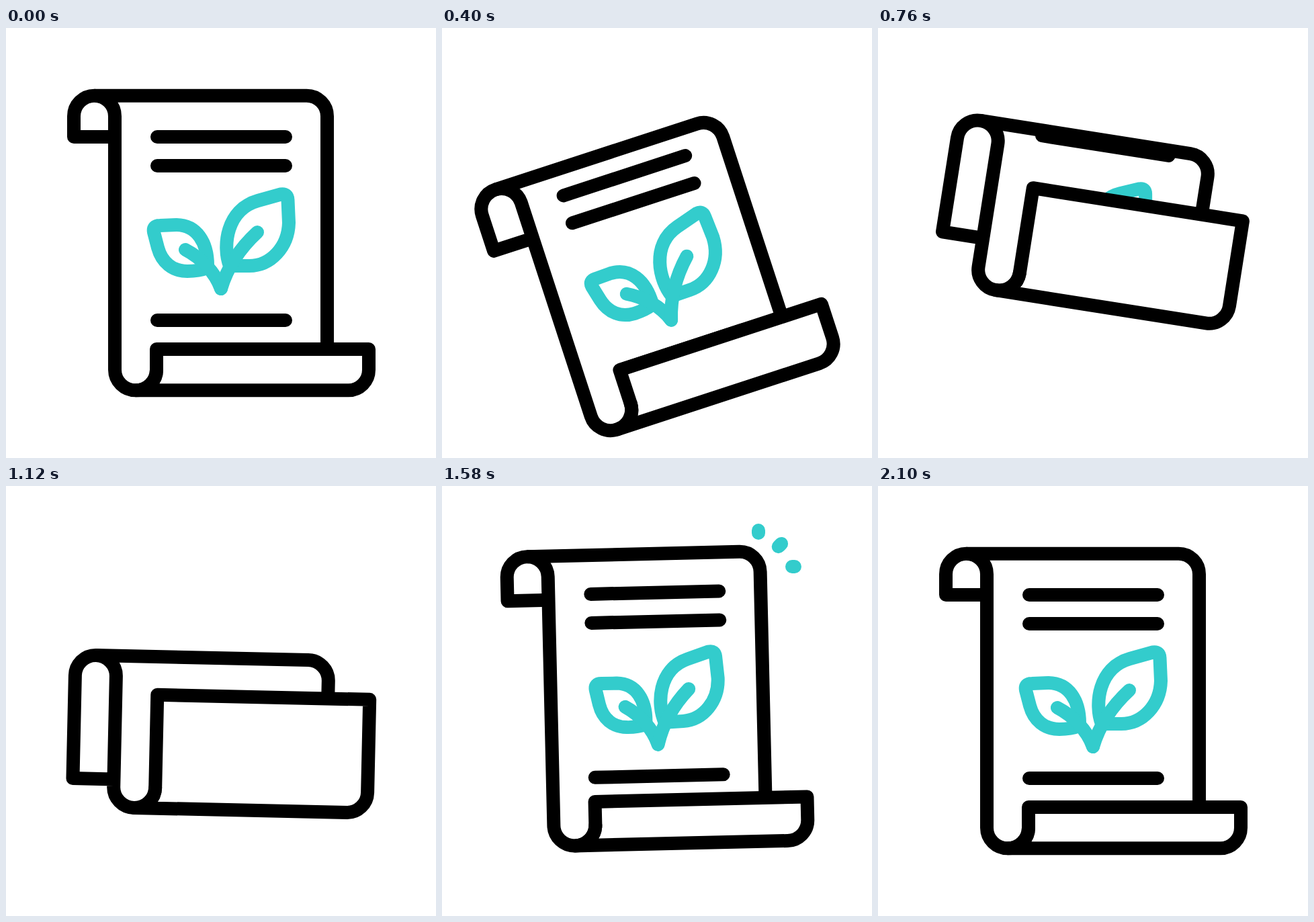
These frames come from a looping animation (640 by 640 pixels, 2400 ms). An HTML page:

```html
<!DOCTYPE html>
<html lang="en">
<head>
<meta charset="utf-8">
<title>Scroll with sprout</title>
<style>
  html, body { margin: 0; width: 100%; height: 100%; overflow: hidden; background: #fff; }
  svg { display: block; width: 100vw; height: 100vh; }
</style>
</head>
<body>
<svg viewBox="0 0 640 640" fill="none" stroke="#000" stroke-width="20" stroke-linecap="round" stroke-linejoin="round">
  <defs>
    <clipPath id="sheet"><rect id="sheetBox" x="162" width="316"/></clipPath>
  </defs>
  <g id="scroll">
    <g clip-path="url(#sheet)">
      <path d="M225 162H416M225 205H416M225 435H416"/>
      <g stroke="#33cccc">
        <g id="leftLeaf">
          <path d="M300 357C301 318 283 293 253 293L229 294Q218 294 220 304L226 327C232 349 248 362 270 362Q287 362 300 357Z"/>
          <path d="M267 330C290 342 311 363 320 388"/>
        </g>
        <g id="rightLeaf">
          <path d="M333 354C322 325 328 270 375 257L409 247.5Q419 246 419.5 256L421 290C420 326 394 354 362 354Z"/>
          <path d="M374 304C350 326 330 355 320 388"/>
        </g>
      </g>
    </g>
    <path id="body" stroke-linecap="butt"/>
    <path id="panel" fill="#fff"/>
    <path id="roll"/>
  </g>
  <g id="sparks" stroke="#33cccc"><path/><path/><path/></g>
</svg>
<script>
const LOOP = 2400;
const $ = id => document.getElementById(id);

// Keys are [ms, value]; turning points get zero slope.
const angleKeys = [[0, 0], [400, -18.1], [770, 9], [1120, 1.3], [1400, -5.45], [1780, 3.4], [2100, 0]];
const liftKeys = [[0, 0], [385, 51], [540, 9], [770, -31.5], [1110, 49.3], [1400, -19.3], [1780, 15], [2100, 0]];
const rollKeys = [[200, 0], [900, 107.5], [1090, 107.5], [1640, 0]];
const foldKeys = [[250, 0], [400, 0.08], [760, 0.6], [1240, 1.3], [1400, 1], [1680, 0]];
const headKeys = [[1540, 0], [1740, 1]];
const tailKeys = [[1640, 0], [1910, 1]];

function slope(keys, i) {
  const a = keys[i - 1], b = keys[i], c = keys[i + 1];
  if (!a || !c || (b[1] - a[1]) * (c[1] - b[1]) <= 0) return 0;
  return (c[1] - a[1]) / (c[0] - a[0]);
}

function sample(keys, t) {
  const last = keys.length - 1;
  if (t <= keys[0][0]) return keys[0][1];
  if (t >= keys[last][0]) return keys[last][1];
  const i = keys.findIndex(k => k[0] > t) - 1;
  const [t0, v0] = keys[i], [t1, v1] = keys[i + 1];
  const span = t1 - t0, u = (t - t0) / span, w = 1 - u;
  return v0 + (v1 - v0) * u * u * (3 - 2 * u)
    + span * u * w * (slope(keys, i) * w - slope(keys, i + 1) * u);
}

function drawScroll(t) {
  const rolled = sample(rollKeys, t);
  const top = 100.7 + rolled, bottom = 539.3 - rolled;
  const flap = 162 + 2.15 * rolled, edge = 478 - 2.01 * rolled;
  $('scroll').setAttribute('transform',
    `translate(0 ${sample(liftKeys, t)}) rotate(${sample(angleKeys, t)} 320 320)`);
  $('sheetBox').setAttribute('y', top);
  $('sheetBox').setAttribute('height', bottom - top);
  $('body').setAttribute('d',
    `M131.5 ${top}H447.5A30.5 30.5 0 0 1 478 ${top + 30.5}V${edge}`);
  $('panel').setAttribute('d',
    `M224 ${edge}H540V${bottom - 30.5}A30.5 30.5 0 0 1 509.5 ${bottom}H193
     A30.5 30.5 0 0 0 224 ${bottom - 30.5}Z`);
  $('roll').setAttribute('d',
    `M162 ${flap}H101V${top + 30.5}A30.5 30.5 0 0 1 162 ${top + 30.5}
     V${bottom - 30.5}A31 30.5 0 0 0 224 ${bottom - 30.5}`);
}

function drawLeaves(t) {
  const fold = sample(foldKeys, t), size = 1 - 0.25 * fold;
  for (const [id, side] of [['leftLeaf', 1], ['rightLeaf', -1]]) {
    $(id).setAttribute('transform',
      `translate(320 388) rotate(${side * 11.3 * fold}) scale(${size}) translate(-320 -388)`);
    $(id).setAttribute('stroke-width', 20 / size);
  }
}

function drawSparks(t) {
  const head = sample(headKeys, t), tail = sample(tailKeys, t);
  const visible = head > 0 && tail < 1;
  $('sparks').setAttribute('visibility', visible ? 'visible' : 'hidden');
  [[-90, 50, 86], [-45, 42, 99], [0, 50, 86]].forEach(([deg, from, to], i) => {
    const a = deg * Math.PI / 180;
    const point = f => {
      const r = from + (to - from) * f;
      return `${471 + r * Math.cos(a)} ${120 + r * Math.sin(a)}`;
    };
    $('sparks').children[i].setAttribute('d', `M${point(tail)}L${point(head)}`);
  });
}

const start = performance.now();
function frame() {
  const t = (performance.now() - start) % LOOP;
  drawScroll(t);
  drawLeaves(t);
  drawSparks(t);
  requestAnimationFrame(frame);
}
frame();
</script>
</body>
</html>
```
